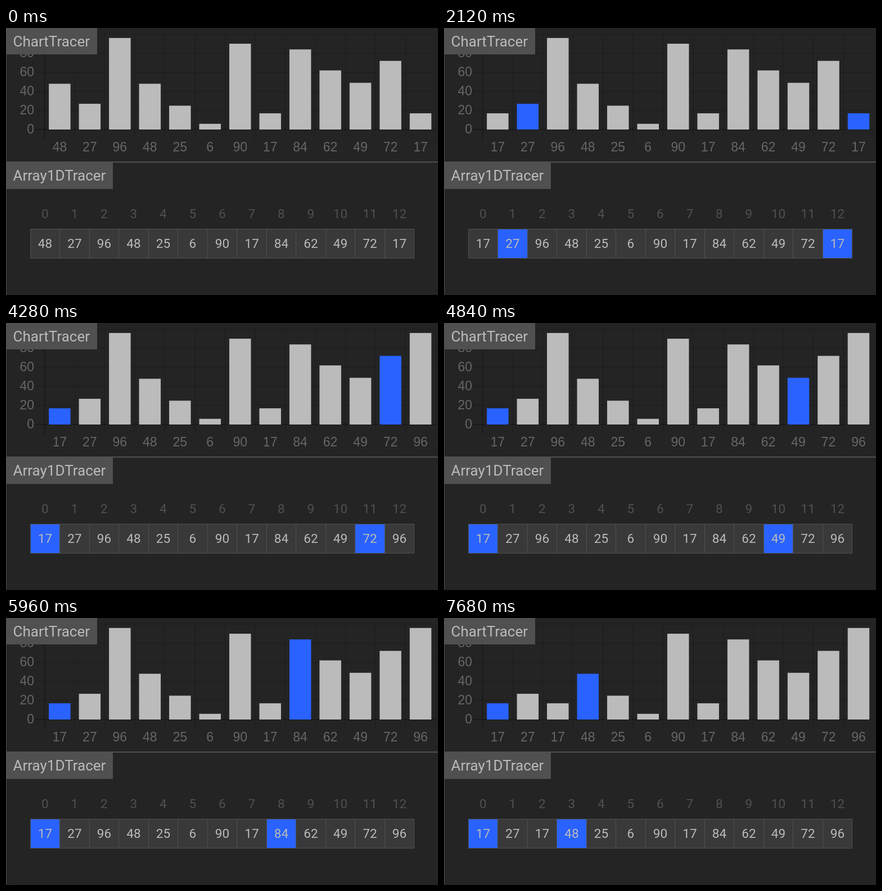
Animation of 768x476 px, one loop 8 s. Source, as an HTML page:

```html
<!DOCTYPE html>
<html lang="en">
<head>
<meta charset="utf-8">
<title>Sort trace</title>
<style>
  html, body { margin: 0; width: 100%; height: 100%; overflow: hidden; background: #242424; }
  svg { display: block; width: 768px; height: 476px; }
  text { font-family: Roboto, sans-serif; font-size: 22.5px; fill: #bbb; text-anchor: middle; }
  .title { font-size: 26px; text-anchor: start; }
  .tick { font-family: "Liberation Sans", Arial, sans-serif; font-size: 23px; fill: #666; }
  .end { text-anchor: end; }
  .index { fill: #505050; }
</style>
</head>
<body>
<svg id="stage" viewBox="0 0 768 476"></svg>
<script>
const LOOP = 8000;
const START = [48, 27, 96, 48, 25, 6, 90, 17, 84, 62, 49, 72, 17];
const COLOR = { bar: '#bbb', cell: '#393939', line: '#505050', selected: '#2962ff', patched: '#c51162' };

// set: [index, new value], kept until the loop restarts
const STEPS = [
  { at: 0, selected: [] },
  { at: 400, selected: [0, 12] },
  { at: 960, selected: [12], patched: 0, set: [0, 17] },
  { at: 1520, selected: [0, 12] },
  { at: 2080, selected: [1, 12] },
  { at: 2600, selected: [], patched: 12, set: [12, 96] },
  { at: 3160, selected: [0, 12] },
  { at: 4280, selected: [0, 11] },
  { at: 4840, selected: [0, 10] },
  { at: 5360, selected: [0, 9] },
  { at: 5920, selected: [0, 8] },
  { at: 6480, selected: [0], patched: 2, set: [2, 17] },
  { at: 7040, selected: [0, 2] },
  { at: 7600, selected: [0, 3] }
];
// The left end stays selected through the first pass.
STEPS[4].selected = [1, 12];
STEPS[5].selected = [];

const CHART = { left: 68.7, right: 763.7, top: 11, base: 181, unit: 1.7 };
const PITCH = (CHART.right - CHART.left) / START.length;
const BAR = PITCH * 0.72;
const CELL = { left: 43, top: 358, size: 52.5 };

const stage = document.getElementById('stage');

function add(tag, attrs, content) {
  const node = document.createElementNS('http://www.w3.org/2000/svg', tag);
  for (const name in attrs) node.setAttribute(name, attrs[name]);
  if (content !== undefined) node.textContent = content;
  return stage.appendChild(node);
}
const rect = (x, y, width, height, fill) => add('rect', { x, y, width, height, fill });
const label = (x, y, content, cls = '') => add('text', { x, y, class: cls }, content);

function gridLine(x1, y1, x2, y2, strong) {
  add('line', { x1, y1, x2, y2, stroke: '#000', 'stroke-opacity': strong ? 0.25 : 0.1, 'stroke-width': 1.875 });
}

function drawGrid() {
  for (let v = 0; v <= 100; v += 20) {
    const y = CHART.base - v * CHART.unit;
    gridLine(CHART.left - 18.75, y, CHART.right, y, v === 0);
    if (v < 100) label(50, y + 6.5, v, 'tick end');
  }
  for (let i = 0; i <= START.length; i++) {
    const x = CHART.left + i * PITCH;
    gridLine(x, CHART.top, x, CHART.base + 18.75, i === 0);
  }
}

function makeItem(value, i) {
  const mid = CHART.left + (i + 0.5) * PITCH;
  const x = Math.floor(CELL.left + i * CELL.size);
  const next = Math.floor(CELL.left + (i + 1) * CELL.size);
  const center = CELL.left + (i + 0.5) * CELL.size + 0.2;
  label(center, 339, i, 'index');
  return {
    bar: rect(mid - BAR / 2, 0, BAR, 0, COLOR.bar),
    tick: label(mid, 220, value, 'tick'),
    cell: rect(x + 1, CELL.top + 1, next - x - 1, 51, COLOR.cell),
    text: label(center, 392, value)
  };
}

function titleBox(y, width, height, baseline, name) {
  rect(0, y, width, height, COLOR.line);
  label(12.5, baseline, name, 'title');
}

rect(0, 0, 768, 476, '#242424');
drawGrid();
rect(CELL.left, CELL.top, 683, 53, COLOR.line);
const items = START.map(makeItem);
rect(0, 0, 1, 476, COLOR.line);
rect(0, 238, 768, 2, COLOR.line);
titleBox(0, 162, 47, 33, 'ChartTracer');
titleBox(239, 190, 48, 272, 'Array1DTracer');

function show(last) {
  const values = START.slice();
  for (const { set } of STEPS.slice(0, last + 1)) if (set) values[set[0]] = set[1];
  const { selected, patched } = STEPS[last];
  items.forEach(({ bar, tick, cell, text }, i) => {
    const mark = i === patched ? COLOR.patched : selected.includes(i) ? COLOR.selected : null;
    const height = values[i] * CHART.unit;
    bar.setAttribute('y', CHART.base - height);
    bar.setAttribute('height', height);
    bar.setAttribute('fill', mark || COLOR.bar);
    cell.setAttribute('fill', mark || COLOR.cell);
    tick.textContent = text.textContent = values[i];
  });
}

let shown = -1;
const begin = performance.now();
function frame() {
  const t = (performance.now() - begin) % LOOP;
  const step = STEPS.findLastIndex(s => s.at <= t);
  if (step !== shown) show(shown = step);
  requestAnimationFrame(frame);
}
frame();
</script>
</body>
</html>
```
